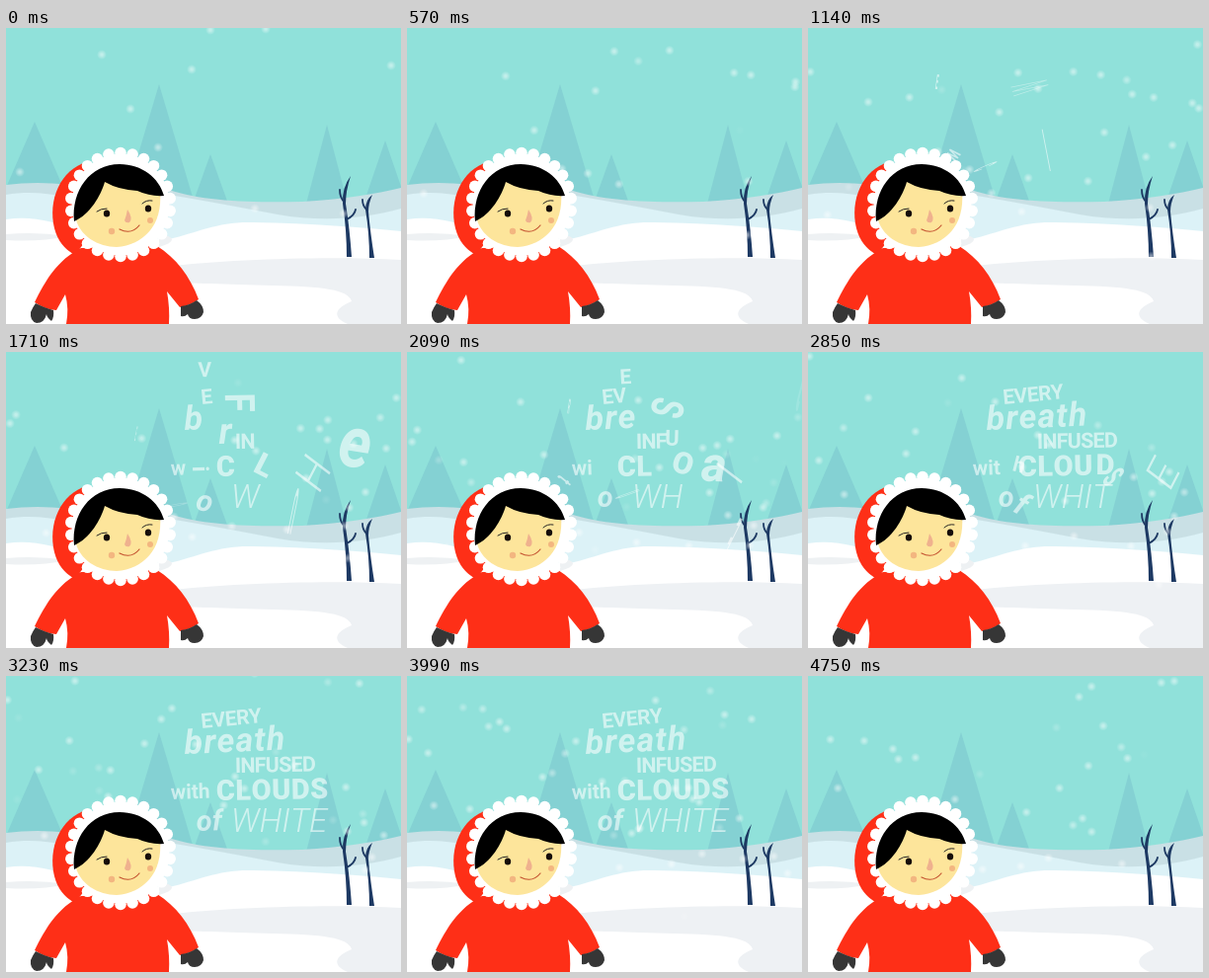
An HTML page with a canvas that plays this animation: 400 by 300 pixels, repeating every 4940 ms.

```html
<!DOCTYPE html>
<html lang="en">
<head>
<meta charset="utf-8">
<title>Winter breath</title>
<style>
html, body { margin: 0; height: 100%; overflow: hidden; }
canvas { display: block; width: 100vw; height: 100vh; }
</style>
</head>
<body>
<canvas id="stage" width="400" height="300"></canvas>
<script>
const ctx = document.getElementById('stage').getContext('2d');
const LOOP = 4940, STEP = 190;
const RED = '#fe2f17', INK = '#1d3963', MITTEN = '#363636';

const clamp = v => Math.max(0, Math.min(1, v));

function fill(color, path) {
  ctx.fillStyle = color;
  ctx.fill(new Path2D(path));
}

function stroke(color, width, path) {
  ctx.strokeStyle = color;
  ctx.lineWidth = width;
  ctx.lineCap = 'round';
  ctx.stroke(new Path2D(path));
}

function oval(color, x, y, rx, ry = rx) {
  ctx.fillStyle = color;
  ctx.beginPath();
  ctx.ellipse(x, y, rx, ry, 0, 0, Math.PI * 2);
  ctx.fill();
}

function drawLandscape() {
  ctx.fillStyle = '#90e1da';
  ctx.fillRect(0, 0, 400, 300);
  // apex x, apex y, half width at the foot
  for (const [x, y, half] of [[29, 95, 36], [155, 57, 36], [207, 128, 18], [325, 98, 21], [384, 114, 22]])
    fill('#84d1d3', `M${x} ${y}L${x + half} 178H${x - half}Z`);
  fill('#c9e0e5', 'M0 159C30 155 60 157 90 163L165 164C200 176 250 177 300 176C340 174 375 168 400 162V300H0Z');
  fill('#dcf2f7', 'M0 169C35 163 65 172 100 180L165 169C205 176 240 182 275 189C320 197 365 193 400 183V300H0Z');
  fill('#ffffff', 'M0 194C25 190 50 196 75 207L165 214C195 207 215 196 250 197C310 198 360 202 400 206V300H0Z');
  fill('#eef1f3', 'M0 209Q30 206 62 211Q35 217 0 215Z');
  fill('#eef1f3', 'M155 208Q181 214 155 222Z');
  fill('#eef1f4', 'M160 242C230 234 330 231 400 235V300H346C328 292 335 283 350 277C347 265 320 262 270 261C220 260 190 258 160 258Z');
}

function drawTwigs() {
  fill(INK, 'M345 232Q345 205 341 178Q340 162 349 150Q344 165 344 178Q348 203 350 232Z');
  fill(INK, 'M368 233Q368 208 364 184Q364 174 371 169Q367 178 367 186Q369 208 373 233Z');
  stroke(INK, 1.8, 'M342 176Q338 171 338 164M345 194Q353 190 354 184M365 184Q361 180 361 174');
}

function drawGirl() {
  // hood and coat
  fill(RED, 'M82 136C55 143 42 175 49 203Q54 222 70 230L100 190Z');
  fill(RED, 'M76 223C52 235 40 256 29 278Q39 285 51 286L60 270Q64 284 61 300H165Q166 284 163 267L176 283Q187 281 195 275C186 251 172 233 153 221Z');
  // mittens
  fill(MITTEN, 'M30 279Q40 284 48 286Q49 293 46 297Q41 293 41 290Q39 299 31 299Q24 297 25 288Q27 283 30 279Z');
  fill(MITTEN, 'M177 282Q186 281 193 276Q200 281 200 288Q198 295 191 295Q185 295 184 290Q181 293 177 292Q177 286 177 282Z');
  // fur trim
  oval('#fff', 116, 179, 49.5, 51.5);
  for (let i = 0; i < 26; i++) {
    const a = (i + 0.5) / 26 * Math.PI * 2;
    oval('#fff', 116 + 50.5 * Math.cos(a), 179 + 52.5 * Math.sin(a), 5.8);
  }
  // face
  fill('#fde59b', 'M70 190C73 211 94 222 112 222C139 220 159 200 156 166L100 150Z');
  fill('#000', 'M69 196C66 165 85 138 115 138C138 138 155 152 160 170Q146 171 133 165Q114 164 100 156C96 170 85 189 69 196Z');
  oval('#f3b680', 107, 206, 3.2);
  oval('#f3b680', 146, 195, 3);
  fill('#efb18e', 'M123 184Q129 193 125 197Q121 198 120 195Q122 190 123 184Z');
  oval('#160d0a', 102, 188, 3.2, 3.6);
  oval('#160d0a', 144, 183, 3.2, 3.6);
  stroke('#222', 1, 'M92 186Q96 183 102 183M138 178Q142 174 148 175');
  stroke('#c4512f', 1.2, 'M115 204Q127 210 135 200');
}

function seededRandom(seed) {
  return () => (seed = seed * 16807 % 2147483647) / 2147483647;
}

const random = seededRandom(411);
const flakes = [[97, 27], [188, 42], [207, 2], [263, 1], [126, 82], [154, 121], [14, 146], [390, 38], [342, 188], [252, 183]]
  .map(([x, y]) => ({ x, y, birth: -400, drift: 5, speed: 38 }));
for (let i = 0; i < 85; i++) {
  flakes.push({
    x: random() * 400,
    y: random() * 200 - 30,
    birth: 50 + random() * 4300,
    drift: random() * 24 - 12,
    speed: 35 + random() * 18
  });
}

function drawSnow(t) {
  for (const f of flakes) {
    const age = t - f.birth;
    const alpha = Math.min(clamp(age / 300), clamp((2000 - age) / 400));
    if (!alpha) continue;
    const seconds = (f.birth < 0 ? t : age) / 1000;
    const x = f.x + f.drift * seconds, y = f.y + f.speed * seconds;
    const glow = ctx.createRadialGradient(x, y, 1, x, y, 5);
    glow.addColorStop(0, `rgba(255,255,255,${0.45 * alpha})`);
    glow.addColorStop(1, 'rgba(255,255,255,0)');
    oval(glow, x, y, 5);
  }
}

// Letters land one after another; "from" and "bend" shape each letter's curved flight,
// and "edge" is the part of it during which the letter is seen edge-on.
const words = [
  { text: 'EVERY', font: '700 21px', gap: -0.5, x: 198, y: 53, tilt: -5.5,
    land: 1520, every: 320, from: [-149, 92], bend: [-10, -91], spin: 20, grow: 0 },
  { text: 'breath', font: 'italic 700 34px', gap: 1.2, x: 181, y: 79, tilt: -2.5,
    land: 1500, every: 230, flight: 350, edge: 0, from: [147, -48], bend: [136, 137], spin: 16, grow: 1.6 },
  { text: 'INFUSED', font: '700 21.5px', gap: -0.8, x: 232, y: 98, tilt: -1,
    land: 1480, every: 205, edge: 0.4, from: [107, 298], bend: [-71, -160], spin: 280, grow: 3 },
  { text: 'with', font: '700 21px', gap: 0, x: 167, y: 125, tilt: -2,
    land: 1450, every: 480, from: [-264, 63], bend: [111, -16], spin: 230, grow: 0.2 },
  { text: 'CLOUDS', font: '900 29px', gap: 0.5, x: 213, y: 126, tilt: -1,
    land: 1560, every: 325, from: [-130, 52], bend: [80, -13], spin: 90, grow: 0.3 },
  { text: 'of', font: 'italic 700 29px', gap: 0, x: 193, y: 157, tilt: -2,
    land: 1790, every: 1200, from: [40, 60], bend: [0, 12], spin: 120, grow: 0.3 },
  { text: 'WHITE', font: 'italic 300 33px', gap: 0, x: 228, y: 158, tilt: 0,
    land: 1600, every: 380, edge: 0.1, from: [-79, -135], bend: [122, 16], spin: -130, grow: 0.7 }
];

function drawWord(word, t) {
  const { flight = 560, edge = 0.25, from, bend } = word;
  ctx.save();
  ctx.translate(word.x, word.y);
  ctx.rotate(word.tilt * Math.PI / 180);
  ctx.font = `${word.font} Roboto, sans-serif`;
  const half = parseFloat(word.font.match(/[\d.]+px/)) * 0.355;
  let pen = 0;
  [...word.text].forEach((letter, i) => {
    const width = ctx.measureText(letter).width;
    const k = Math.max(0, (word.land + i * word.every - t) / flight);
    if (k < 1) {
      const [dx, dy] = from.map((f, axis) => f * k * k + 2 * bend[axis] * k * (1 - k));
      const scale = 1 + word.grow * k;
      ctx.save();
      ctx.translate(pen + width / 2 + dx, dy - half);
      ctx.rotate(word.spin * k * Math.PI / 180);
      ctx.scale(scale * Math.max(0.1, clamp((1 - k - edge) * 3)), scale);
      ctx.globalAlpha *= clamp((1 - k) * 4);
      ctx.fillText(letter, 0, half);
      ctx.restore();
    }
    pen += width + word.gap;
  });
  ctx.restore();
}

function drawVerse(t) {
  const fade = clamp((t - 4080) / 640);
  if (fade === 1) return;
  ctx.save();
  ctx.globalAlpha = 0.58 * (1 - fade);
  if (fade) ctx.filter = `blur(${fade * 5}px)`;
  ctx.translate(0, -15 * fade);
  ctx.fillStyle = '#fff';
  ctx.textAlign = 'center';
  words.forEach(word => drawWord(word, t));
  ctx.restore();
}

function frame() {
  const t = Math.floor(performance.now() % LOOP / STEP) * STEP;
  drawLandscape();
  drawTwigs();
  drawSnow(t);
  drawVerse(t);
  drawGirl();
  requestAnimationFrame(frame);
}
frame();
</script>
</body>
</html>
```
